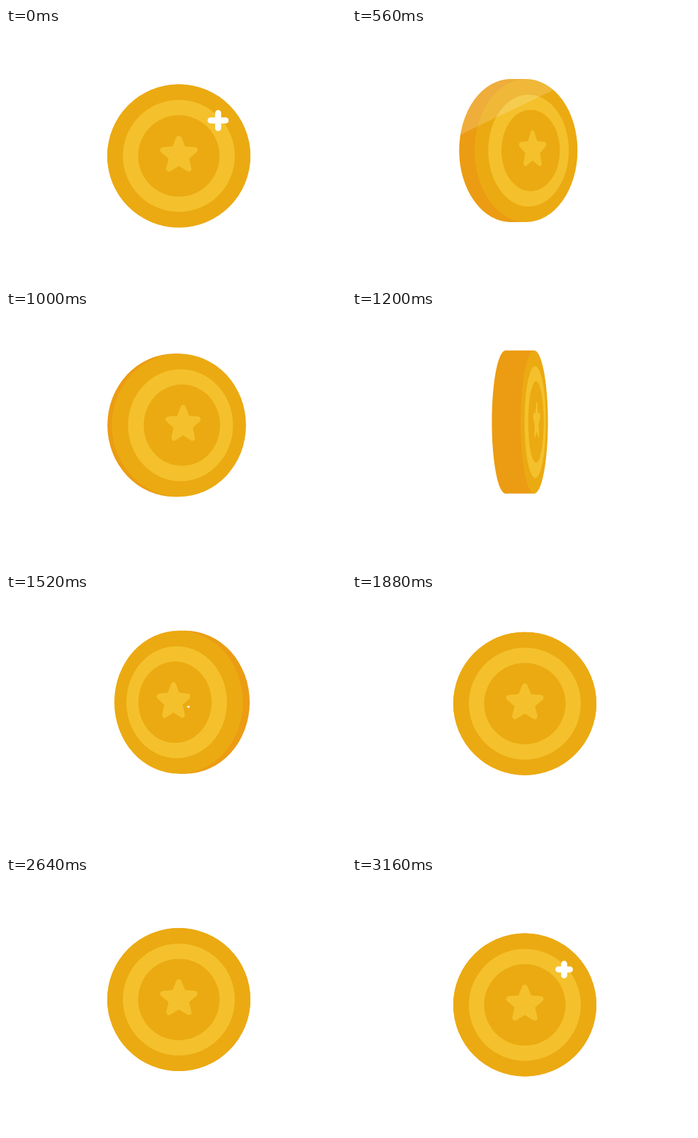
Recreate the animation shown at these times as an HTML page with a canvas. Size 480 by 360 pixels, loop 3.2 s.

```html
<!DOCTYPE html>
<html lang="en">
<head>
<meta charset="utf-8">
<title>Spinning coin</title>
<style>
html, body { margin: 0; width: 100%; height: 100%; overflow: hidden; background: #fff; }
canvas { display: block; width: 480px; height: 360px; }
</style>
</head>
<body>
<canvas id="stage" width="480" height="360"></canvas>
<script>
const ctx = document.getElementById('stage').getContext('2d');
const LOOP = 3200, CX = 244, R = 101;
const FACE = '#ebaa11', RING = '#f4c12d', SIDE = '#eb9c13';

// time, angle in degrees, speed in degrees per ms
const SPIN = [
  [0, 0, 0], [560, 44, 0.236], [840, 147, 0.35],
  [1200, 259, 0.27], [1520, 334, 0.165], [1800, 360, 0]
];

function angleAt(t) {
  for (let i = 1; i < SPIN.length; i++) {
    const [t0, a0, v0] = SPIN[i - 1], [t1, a1, v1] = SPIN[i];
    if (t > t1) continue;
    const d = t1 - t0, u = (t - t0) / d, w = 1 - u;
    return a0 * w * w * (1 + 2 * u) + a1 * u * u * (3 - 2 * u)
      + d * u * w * (v0 * w - v1 * u);
  }
  return 360;
}

function poseAt(t) {
  const phase = angleAt(t) % 180;
  const dir = phase < 90 ? 1 : -1;
  const deg = dir > 0 ? phase : 180 - phase;
  const a = deg * Math.PI / 180, sin = Math.sin(a), cos = Math.cos(a);
  const face = CX + dir * 21 * (deg / 90) ** 3.5;
  return {
    cos, face,
    y: 166.6 + 14 * Math.cos(t * Math.PI / 1600),
    back: face - dir * 42 * sin ** 1.8,
    lean: dir * sin * cos
  };
}

function disc(x, y, rx, ry, color) {
  ctx.fillStyle = color;
  ctx.beginPath();
  ctx.ellipse(x, y, rx, ry, 0, 0, Math.PI * 2);
  ctx.fill();
}

function star(x, y, sx) {
  ctx.save();
  ctx.translate(x, y);
  ctx.scale(Math.max(sx, 0.01), 1);
  ctx.beginPath();
  for (let i = 0; i < 10; i++) {
    const r = i % 2 ? 10.5 : 23.5, a = (i / 5 - 0.5) * Math.PI;
    ctx.lineTo(r * Math.cos(a), r * Math.sin(a));
  }
  ctx.closePath();
  ctx.fillStyle = ctx.strokeStyle = RING;
  ctx.lineWidth = 8;
  ctx.lineJoin = 'round';
  ctx.fill();
  ctx.stroke();
  ctx.restore();
}

function coin(p) {
  const rx = R * p.cos;
  disc(p.back, p.y, rx, R, SIDE);
  ctx.fillRect(Math.min(p.back, p.face), p.y - R, Math.abs(p.back - p.face), 2 * R);
  disc(p.face, p.y, rx, R, FACE);
  disc(p.face + 7 * p.lean, p.y, 79 * p.cos, 79, RING);
  disc(p.face + 13 * p.lean, p.y, 57.5 * p.cos, 57.5, FACE);
  star(p.face + 18.5 * p.lean, p.y - 1, p.cos);
}

function clipCoin(p) {
  const rx = R * p.cos, left = Math.min(p.back, p.face), right = Math.max(p.back, p.face);
  ctx.beginPath();
  ctx.ellipse(left, p.y, rx, R, 0, Math.PI / 2, Math.PI * 1.5);
  ctx.ellipse(right, p.y, rx, R, 0, -Math.PI / 2, Math.PI / 2);
  ctx.closePath();
  ctx.clip();
}

// Slanted light bands that sweep up to the left
function sheen(p, t) {
  const edge = t < 1400 ? 270 - 0.6 * t : 150 - 0.6 * (t - 2200);
  if (edge < -115 || edge > 255) return;
  ctx.save();
  clipCoin(p);
  ctx.fillStyle = `rgba(255,255,255,${0.15 - edge * 0.0003})`;
  ctx.translate(CX, p.y);
  ctx.transform(1, -0.48, 0, 1, 0, 0);
  for (const [top, h] of [[-139, 13], [-122, 10], [-60, 60]])
    ctx.fillRect(-150, edge + top, 300, h);
  ctx.restore();
}

function sparkle(x, y, size, t, start) {
  const u = ((t - start + LOOP) % LOOP) / 340;
  if (u >= 1) return;
  const k = Math.sin(u * Math.PI), arm = size * k / 2, w = Math.min(8.5, size * k * 0.4);
  ctx.strokeStyle = '#fff';
  ctx.lineWidth = w;
  ctx.lineCap = 'round';
  ctx.beginPath();
  ctx.moveTo(x - arm + w / 2, y);
  ctx.lineTo(x + arm - w / 2, y);
  ctx.moveTo(x, y - arm + w / 2);
  ctx.lineTo(x, y + arm - w / 2);
  ctx.stroke();
}

// Brief twisted glint on the turning face
function glint(p, t) {
  const k = 1 - Math.abs(t - 840) / 100;
  ctx.fillStyle = '#fff';
  if (k > 0) {
    ctx.save();
    ctx.translate(247, p.y + 30);
    ctx.scale(k, k);
    ctx.beginPath();
    ctx.moveTo(0, 0);
    ctx.bezierCurveTo(-4, -6, -8, -14, -16, -11);
    ctx.bezierCurveTo(-26, -9, -18, 0, -11, 0);
    ctx.bezierCurveTo(-6, 0, -3, -1, 0, 0);
    ctx.bezierCurveTo(7, 4, 14, 1, 20, 3);
    ctx.bezierCurveTo(26, 7, 16, 18, 9, 18);
    ctx.bezierCurveTo(0, 18, 6, 9, 0, 0);
    ctx.fill();
    ctx.restore();
  }
  const s = 1 - Math.abs(t - 1520) / 80;
  if (s > 0) {
    ctx.beginPath();
    ctx.moveTo(257.5 - 2.5 * s, p.y + 5.5);
    ctx.lineTo(257.5 + 2.5 * s, p.y + 5.5);
    ctx.lineTo(257.5, p.y + 5.5 + 3 * s);
    ctx.fill();
  }
}

function draw(now) {
  const t = now % LOOP, p = poseAt(t);
  ctx.fillStyle = '#fff';
  ctx.fillRect(0, 0, 480, 360);
  coin(p);
  sheen(p, t);
  glint(p, t);
  sparkle(299.5, p.y - 50, 31, t, 3060);
  sparkle(198.5, p.y - 60.5, 32, t, 2030);
}

let start = null;
function frame(now) {
  if (start === null) start = now;
  draw(now - start);
  requestAnimationFrame(frame);
}
draw(0);
requestAnimationFrame(frame);
</script>
</body>
</html>
```
